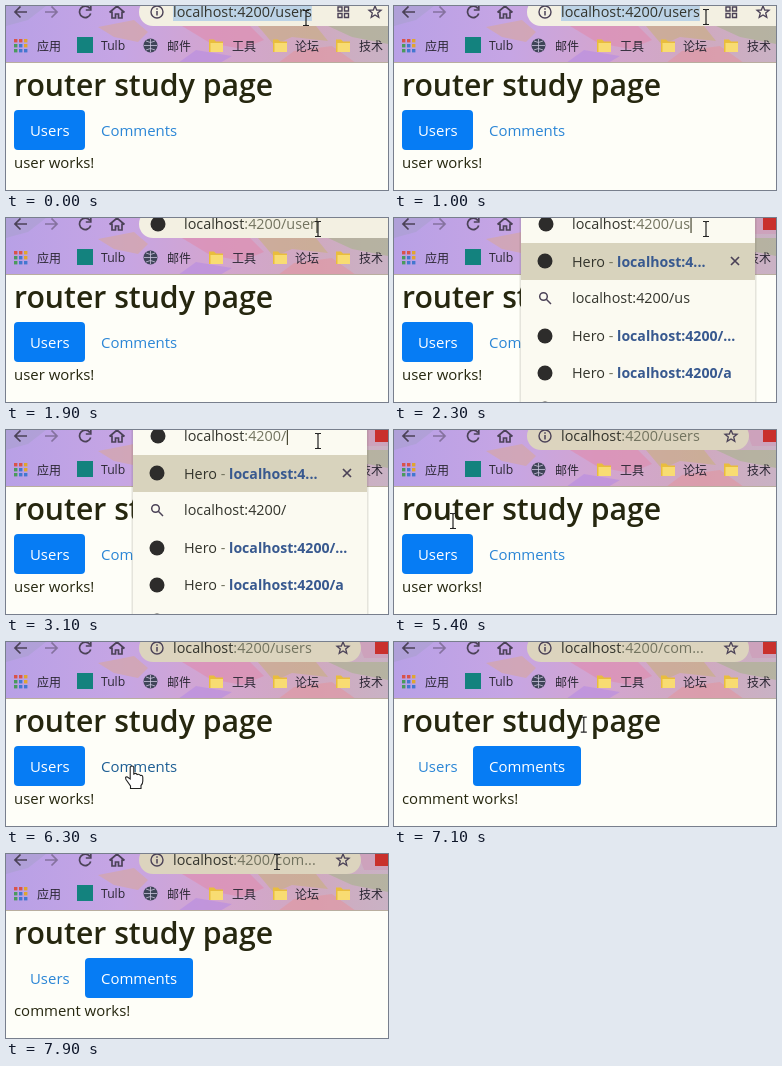
Animation, 382 px wide and 184 px high, one loop 8000 ms. Source, as an HTML page:

```html
<!DOCTYPE html>
<html lang="en">
<head>
<meta charset="utf-8">
<title>Router study page</title>
<style>
html, body { margin: 0; width: 100%; height: 100%; overflow: hidden; background: #fefef8; }
svg { display: block; width: 100%; height: 100%; font: 14.95px "Open Sans", "Noto Sans", sans-serif; fill: #26270f; }
text { white-space: pre; }
.line { fill: none; stroke: #4b4257; stroke-width: 1.7; }
.marks { font: 12px "Noto Sans CJK SC", "Noto Sans CJK", "Open Sans", sans-serif; fill: #2b2733; }
.latin { font: 12.2px "Open Sans", sans-serif; }
.url { font-size: 14.4px; fill: #33342c; }
.path { fill: #72735f; }
.link { font-weight: 700; font-size: 14.1px; fill: #38598f; }
.tab { fill: #2b86d6; }
.tab.on { fill: #fff; }
.tab.hover { fill: #1d5e94; }
.hide { display: none; }
</style>
</head>
<body>
<svg viewBox="0 0 382 184">
  <defs>
    <linearGradient id="sky">
      <stop offset="0" stop-color="#b8a0e6"/>
      <stop offset=".3" stop-color="#c6a5e4"/>
      <stop offset=".55" stop-color="#d3a5cf"/>
      <stop offset=".8" stop-color="#d0a9c0"/>
      <stop offset="1" stop-color="#c9b2c4"/>
    </linearGradient>
    <g id="folder">
      <path d="M0 1.5h5l2 2h7V14H0z" fill="#e9bd3d"/>
      <path d="M1.5 5H14v9H1.5z" fill="#f8dc72"/>
    </g>
    <path id="star" class="line" style="stroke-width:1.3" d="M0-6 1.7-2 6-1.8 2.7 1 3.8 5.3 0 2.9-3.8 5.3-2.7 1-6-1.8-1.7-2z"/>
    <circle id="site" r="7.5" fill="#2d2c2b"/>
  </defs>

  <!-- browser chrome -->
  <rect width="382" height="57" fill="url(#sky)"/>
  <g opacity=".6">
    <path d="M92 21 128 14 142 26 132 36 108 31z" fill="#d8a79d"/>
    <path d="M0 0H40L22 14 0 20z" fill="#aaa0cf"/>
    <path d="M176 20h68l14 14-22 9-32-6z" fill="#e08cae"/>
    <path d="M190 44 226 50 214 57H172z" fill="#b78ce3"/>
    <path d="M252 20h58l12 15-36-4-18 8z" fill="#c9b07f"/>
    <path d="M288 45 326 40 350 57H272z" fill="#e296a0"/>
    <path d="M322 20h60v18l-36-7z" fill="#a9b48c"/>
    <path d="M352 0h30v16h-24z" fill="#cf9ab8"/>
  </g>
  <path d="M0 56.5H382" stroke="#b9ae9f"/>

  <g class="line">
    <path d="M21 6H9M14.500.5 9 6l5.500 5.500"/>
    <path opacity=".5" d="M39 6H51M45.500.5 51 6l-5.500 5.500"/>
    <path id="reload" d="M83.800 2.400A5.700 5.700 0 1 0 84.700 7.500M84.800-1V4H79.800"/>
    <path id="stop" d="M74 1 84 11M84 1 74 11"/>
    <path d="M103.500 6.500 111 0l7.500 6.500M106 5.500V12h3.500V8h3v4h3.500V5.500"/>
  </g>

  <g class="marks">
    <g id="apps"></g>
    <text x="31" y="44.500">应用</text>
    <rect x="71" y="31" width="16" height="16" fill="#13827e"/>
    <text class="latin" x="95" y="44">Tulb</text>
    <circle cx="144.500" cy="39.500" r="7" fill="#3f4558"/>
    <path d="M138 39.500h13M144.500 33v13M140 35q4.500 3 9 0M140 44q4.500-3 9 0" fill="none" stroke="#c9c3dc" stroke-width=".8"/>
    <text x="161" y="44.500">邮件</text>
    <use href="#folder" x="203" y="32"/><text x="226" y="44.500">工具</text>
    <use href="#folder" x="267" y="32"/><text x="289" y="44.500">论坛</text>
    <use href="#folder" x="330" y="32"/><text x="353" y="44.500">技术</text>
  </g>

  <!-- address bar -->
  <rect id="ext" x="369" y="-3" width="14" height="15" fill="#c9302c"/>
  <rect id="pill" x="133" y="-8" width="222" height="28" rx="14"/>
  <rect id="sel" x="167" y="-3" height="18" fill="#bcd3e6"/>
  <g id="info">
    <circle class="line" cx="151" cy="6" r="6" style="stroke-width:1.400"/>
    <path d="M151 5v4.500M151 2.300v1.500" class="line" style="stroke-width:1.500"/>
  </g>
  <path id="grid" class="line" style="stroke-width:1.400" d="M332 1h4v4h-4zM338.500 1h4v4h-4zM332 7.500h4v4h-4zM338.500 7.500h4v4h-4z"/>
  <use id="fav" href="#star" y="6"/>

  <!-- page -->
  <g id="page">
    <text x="8" y="90" font-size="30.200" font-weight="600">router study page</text>
    <rect id="active" y="104" height="40" rx="4" fill="#067cf4"/>
    <text id="users" class="tab" x="24" y="130">Users</text>
    <text id="comments" class="tab" x="95" y="130">Comments</text>
    <text id="body" x="8" y="162"></text>
  </g>

  <!-- suggestions -->
  <g id="menu" class="url">
    <rect x="125.500" y="-10" width="237" height="210" fill="#5a5140" opacity=".15"/>
    <rect x="127" y="-10" width="234" height="200" fill="#fbfaf1"/>
    <rect x="127" y="25" width="234" height="37" fill="#d8d3bd"/>
    <use href="#site" x="151" y="43"/>
    <text x="178" y="48.500">Hero <tspan class="path">- </tspan><tspan class="link">localhost:4...</tspan></text>
    <path class="line" d="M337 39l8 8M345 39l-8 8"/>
    <circle class="line" cx="149.500" cy="78.500" r="3.800" style="stroke-width:1.500"/>
    <path class="line" style="stroke-width:1.500" d="M152.300 81.300 157 86"/>
    <text id="echo" x="178" y="85"></text>
    <use href="#site" x="151" y="118"/>
    <text x="178" y="123">Hero <tspan class="path">- </tspan><tspan class="link">localhost:4200/...</tspan></text>
    <use href="#site" x="151" y="155"/>
    <text x="178" y="160">Hero <tspan class="path">- </tspan><tspan class="link">localhost:4200/a</tspan></text>
    <use href="#site" x="151" y="191"/>
  </g>
  <use id="icon" href="#site" x="152" y="6"/>
  <text id="url" class="url" y="11"><tspan>localhost</tspan><tspan id="rest"></tspan></text>
  <rect id="caret" y="-1" width="1" height="16"/>

  <!-- pointers, hot spot at 0,0 -->
  <g id="pointer">
    <path id="beam" d="M-3-7.500h2.300L0-6.800.7-7.500H3M0-6.800V6.800M-3 7.500h2.300L0 6.800.7 7.500H3" fill="none" stroke="#222" stroke-width="1.200"/>
    <path id="arrow" d="M0 0V16L3.800 12.500 6.400 18.300 8.900 17.200 6.300 11.500H11.500z" fill="#fff" stroke="#222"/>
    <path id="hand" d="M-1.800 1.200Q0-1.200 1.800 1.200V8q2-1.500 3.400.6 2-1 3.200.9 2.400-.6 2.400 2V15q0 3-1.800 4.500V22.500H-1.500V20L-6 13.500q-1.200-3 1-2.800L-1.800 13z" fill="#fff" stroke="#222" stroke-width="1.100"/>
  </g>
</svg>
<script>
const LOOP = 8000, STEP = 100;
const $ = id => document.getElementById(id);
const show = (id, on) => $(id).classList.toggle('hide', !on);
const at = (list, t) => list.filter(k => k[0] <= t).pop();
const set = (id, attrs) => Object.entries(attrs).forEach(([k, v]) => $(id).setAttribute(k, v));

// [time, text after the host]
const address = [
  [0, ':4200/users'], [1700, ':4200/user'], [2100, ':4200/use'], [2300, ':4200/us'],
  [2600, ':4200/u'], [2800, ':4200/'], [3400, ':4200'], [4500, ':4200/users'], [6600, ':4200/com...']
];

// [time, x, y]
const moves = [
  [0, 300, 12], [400, 300, 12], [1000, 312, 11], [3400, 312, 11], [4100, 202, 170],
  [4900, 202, 170], [5400, 59, 91], [5500, 59, 91], [6300, 126, 124],
  [6700, 126, 124], [7600, 279, 25], [7900, 271, 8], [8000, 271, 8]
];

function pointer(t) {
  const n = moves.findIndex(m => m[0] > t);
  const [t0, x0, y0] = moves[n - 1], [t1, x1, y1] = moves[n];
  const p = (t - t0) / (t1 - t0), e = p * p * (3 - 2 * p);
  return [x0 + (x1 - x0) * e, y0 + (y1 - y0) * e];
}

function shape(x, y, page) {
  const within = (l, t, r, b) => x >= l && x < r && y >= t && y < b;
  if (within(167, 0, 330, 20)) return 'beam';
  if (page && within(8, 104, 187, 144)) return 'hand';
  if (page && (within(8, 64, 267, 102) || within(8, 148, 88, 168))) return 'beam';
  return 'arrow';
}

function render(t) {
  const focus = t < 3400, typing = t >= 1700 && focus, menu = t >= 2000 && focus;
  const wide = t < 2000, selected = t < 1200, loading = t >= 3400 && t < 4500;
  const page = t < 4500 || t >= 4600, second = t >= 6600;

  const rest = at(address, t)[1], left = typing ? 178 : 167;
  $('rest').textContent = rest;
  $('rest').setAttribute('class', selected ? '' : 'path');
  $('echo').textContent = 'localhost' + rest;
  set('url', { x: left });
  const width = $('url').getComputedTextLength();
  set('sel', { width });
  set('caret', { x: left + width + 0.5 });
  set('pill', { width: wide ? 264 : 222, fill: focus ? '#f3f0e2' : '#dcd4be' });
  set('fav', { x: wide ? 369 : 337 });
  show('sel', selected);
  show('caret', focus && !selected);
  show('info', !typing);
  show('icon', typing);
  show('grid', t < 1700);
  show('fav', !typing);
  show('ext', !wide);
  show('menu', menu);
  show('stop', loading);
  show('reload', !loading);

  const [x, y] = pointer(t), kind = shape(x, y, page);
  set('pointer', { transform: `translate(${x.toFixed(1)} ${y.toFixed(1)})` });
  ['beam', 'arrow', 'hand'].forEach(k => show(k, k === kind));

  show('page', page);
  set('active', second ? { x: 79, width: 108 } : { x: 8, width: 71 });
  $('users').classList.toggle('on', !second);
  $('comments').classList.toggle('on', second);
  $('comments').classList.toggle('hover', !second && kind === 'hand' && x > 79);
  $('body').textContent = second ? 'comment works!' : 'user works!';
}

const dots = ['#d9534a', '#d9534a', '#e0a52f', '#4a9a5c', '#4377cf', '#e0a52f', '#4a9a5c', '#4377cf', '#4377cf'];
$('apps').innerHTML = dots.map((c, i) =>
  `<rect x="${8 + i % 3 * 5}" y="${33 + Math.floor(i / 3) * 5}" width="3.4" height="3.4" fill="${c}"/>`).join('');

const start = performance.now();
function tick() {
  const t = (performance.now() - start) % LOOP;
  render(Math.floor(t / STEP) * STEP);
  requestAnimationFrame(tick);
}
tick();
</script>
</body>
</html>
```
